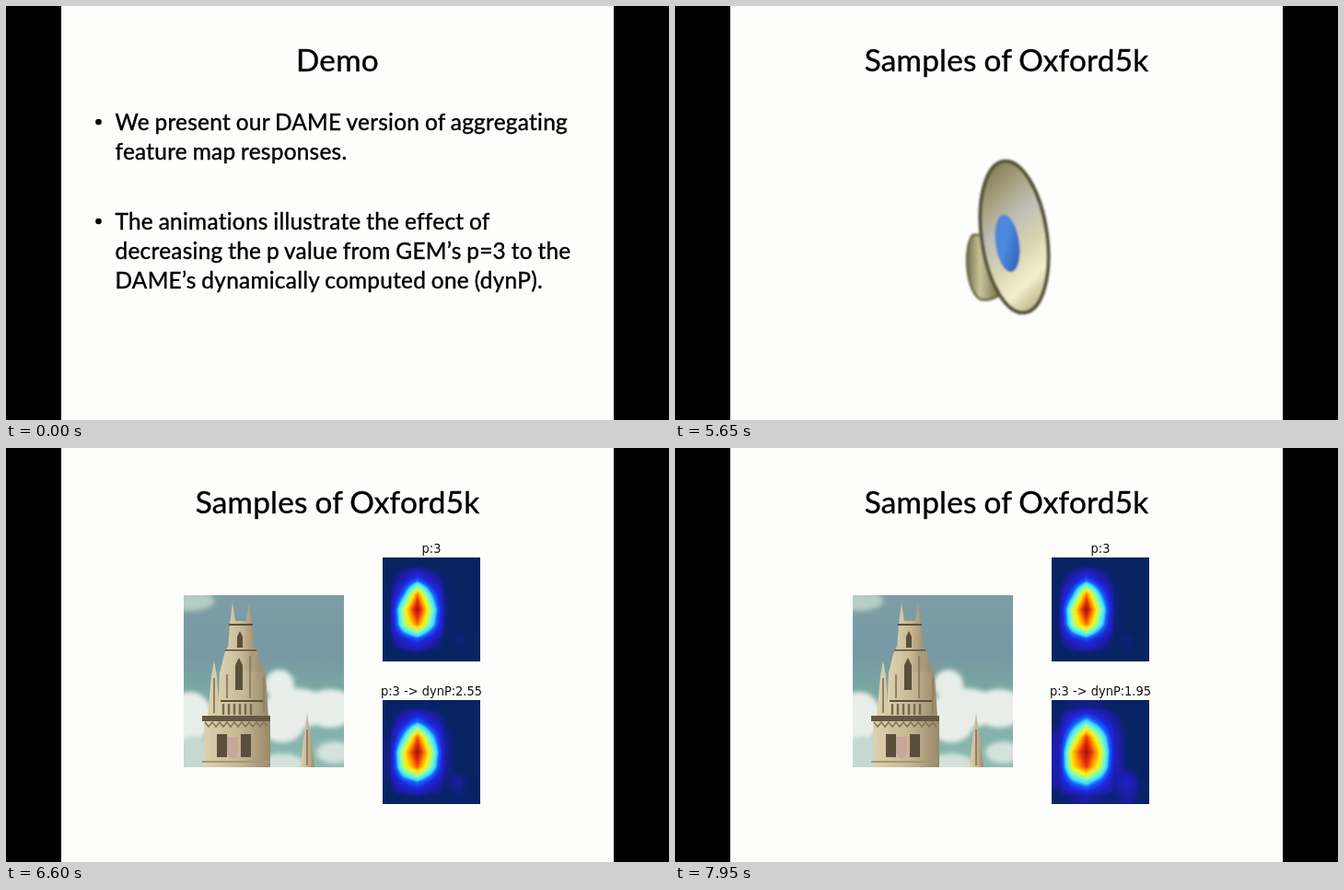
An HTML page with a canvas that plays this animation: 720x450 px, repeating every 8000 ms.

```html
<!DOCTYPE html>
<html lang="en">
<head>
<meta charset="utf-8">
<title>Demo slides</title>
<style>
html, body { margin: 0; width: 100%; height: 100%; overflow: hidden; background: #000; }
#stage { position: absolute; left: 0; top: 0; width: 720px; height: 450px; overflow: hidden; }
#stage > svg { position: absolute; left: 0; top: 0; }
canvas { position: absolute; left: 409px; width: 106px; height: 113px; }
#top { top: 119px; }
#low { top: 274px; }
.title, .body { stroke: #000; stroke-width: .4px; }
.title { font: 33.3px Lato, sans-serif; letter-spacing: .25px; word-spacing: -1px; text-anchor: middle; }
.body { font: 24.4px Lato, sans-serif; letter-spacing: .27px; word-spacing: -.8px; }
.label { font: 13px "DejaVu Sans", sans-serif; text-anchor: middle; }
</style>
</head>
<body>
<div id="stage">
<svg width="720" height="450" viewBox="0 0 720 450">
  <defs>
    <linearGradient id="sky" x1="0" y1="0" x2="0" y2="1">
      <stop offset="0" stop-color="#7d9ea6"/><stop offset=".35" stop-color="#7799a4"/>
      <stop offset=".55" stop-color="#78a8a2"/><stop offset="1" stop-color="#8db9b1"/>
    </linearGradient>
    <linearGradient id="stone">
      <stop offset="0" stop-color="#ddd2ae"/><stop offset=".55" stop-color="#c6b592"/>
      <stop offset="1" stop-color="#988969"/>
    </linearGradient>
    <linearGradient id="cone" x1=".3" y1="0" x2=".6" y2="1">
      <stop offset="0" stop-color="#807a50"/><stop offset=".22" stop-color="#a8a280"/>
      <stop offset=".42" stop-color="#c2bfb8"/><stop offset=".62" stop-color="#d8d3ae"/>
      <stop offset=".82" stop-color="#f3efcf"/><stop offset="1" stop-color="#bdb78a"/>
    </linearGradient>
    <linearGradient id="magnet">
      <stop offset="0" stop-color="#77714a"/><stop offset=".4" stop-color="#c9c49a"/>
      <stop offset="1" stop-color="#6e6945"/>
    </linearGradient>
    <linearGradient id="dome" x1="0" y1="0" x2="1" y2="1">
      <stop offset="0" stop-color="#4f86cf"/><stop offset=".45" stop-color="#4b8ade"/>
      <stop offset="1" stop-color="#2a57ac"/>
    </linearGradient>
    <filter id="soft"><feGaussianBlur stdDeviation="2.5"/></filter>
    <filter id="blur"><feGaussianBlur stdDeviation="1"/></filter>
  </defs>

  <rect x="60" width="600" height="450" fill="#fdfdfc"/>

  <g id="intro">
    <text class="title" x="360" y="71">Demo</text>
    <circle cx="100.5" cy="126" r="3.3"/>
    <circle cx="100.5" cy="234" r="3.3"/>
    <g class="body">
      <text x="118.5" y="134.5">We present our DAME version of aggregating</text>
      <text x="118.5" y="166.5">feature map responses.</text>
      <text x="118.5" y="243">The animations illustrate the effect of</text>
      <text x="118.5" y="275">decreasing the p value from GEM’s p=3 to the</text>
      <text x="118.5" y="307">DAME’s dynamically computed one (dynP).</text>
    </g>
  </g>

  <g id="samples">
    <text class="title" x="360" y="71">Samples of Oxford5k</text>

    <g id="speaker" filter="url(#blur)">
      <path d="M323 249Q334 246 345 262L353 314Q343 321 332 319C317 312 312 266 323 249Z"
        fill="url(#magnet)" stroke="#6b6744" stroke-width="2.5"/>
      <ellipse cx="368.5" cy="251" rx="35.5" ry="83" transform="rotate(-8 368.5 251)"
        fill="url(#cone)" stroke="#57523a" stroke-width="4"/>
      <ellipse cx="361" cy="258" rx="13" ry="31.5" transform="rotate(-8 361 258)" fill="url(#dome)"/>
    </g>

    <g id="results">
      <svg x="193" y="160" width="174" height="187" viewBox="193 160 174 187">
        <rect x="193" y="160" width="174" height="187" fill="url(#sky)"/>
        <g fill="#e9eeea" filter="url(#soft)">
          <ellipse cx="200" cy="166" rx="26" ry="11" fill="#b5cdc4"/>
          <ellipse cx="200" cy="292" rx="24" ry="27"/>
          <ellipse cx="297" cy="257" rx="16" ry="16"/>
          <ellipse cx="315" cy="283" rx="36" ry="22"/>
          <ellipse cx="352" cy="283" rx="28" ry="21"/>
          <ellipse cx="300" cy="300" rx="24" ry="20"/>
          <ellipse cx="204" cy="335" rx="22" ry="22" fill="#c4d9d2"/>
          <ellipse cx="357" cy="331" rx="20" ry="12" fill="#d3e2dc"/>
          <ellipse cx="300" cy="344" rx="24" ry="12" fill="#d3e2dc"/>
        </g>
        <g fill="url(#stone)">
          <path d="M243 191L246 168L249 188H261L264 168L267 191L270 220L273 246H237L241 220Z"/>
          <path d="M237 224L241 215L244 245H232ZM268 245L269 215L274 224L279 245Z"/>
          <path d="M232 243H279L284 292H230Z"/>
          <path d="M219 292L223 248L226 231L229 248L232 292ZM275 292L278 248L280 231L282 248L285 292Z"/>
          <path d="M215 296H287V347H215Z"/>
          <path d="M320 347L323 316L327 288L331 316L335 347Z"/>
        </g>
        <path d="M213 291H287V297H213Z" fill="#645842"/>
        <path d="M216 298l4 5 4-5 4 5 4-5 4 5 4-5 4 5 4-5 4 5 4-5 4 5 4-5 4 5 4-5 4 5 4-5 4 5"
          fill="none" stroke="#83745a" stroke-width="1.5"/>
        <g fill="#594f3c">
          <path d="M251 217V205L254 199L257 205V217ZM249 263V236L253 228L257 236V263Z"/>
          <path d="M229 311H240V336H229ZM255 311H266V336H255Z"/>
          <path d="M242 191H268V193H242ZM238 219H272V220.5H238ZM233 274H280V276H233Z"/>
        </g>
        <path d="M236 278V290M242 278V290M248 278V290M254 278V290M260 278V290M266 278V290"
          stroke="#766950" stroke-width="2.5"/>
        <path d="M240 246V272M265 226V272M226 250V288M280 250V288M327 306V345"
          stroke="#927f67" stroke-width="2"/>
        <path d="M240 314H252V328Q252 335 246 338Q240 335 240 328Z" fill="#c6a79b"/>
        <path d="M213 341H286" stroke="#a59678" stroke-width="2"/>
      </svg>
      <g class="label" fill="#111">
        <text transform="translate(462 113.5) scale(1 1.07)">p:3</text>
        <text id="count" transform="translate(462 269) scale(1 1.07)"></text>
      </g>
    </g>
  </g>
</svg>
<canvas id="top" width="106" height="113"></canvas>
<canvas id="low" width="106" height="113"></canvas>
</div>

<script>
const $ = id => document.getElementById(id);
const SLIDE = 5650, VIDEO = 5700, LOOP = 8000, FIRST = 5570, STEP = 1000 / 3;

// Pooled responses at p = 3 on a 7 x 7 grid, in percent of the peak
const N = 7;
const grid = [
  [.2, .8, 1.2, .8, .2, .1, .1],
  [.5, 11,  27, 11,  2, .1, .1],
  [2,  31,  80, 35,  4, .1, .1],
  [3,  58, 100, 52,  5, .1, .1],
  [3,  52,  80, 43,  4, .3, .1],
  [2,  17,  27, 13,  2,  5, .3],
  [.3,  1,   2,  1, .8,  2, .3]
];

const palette = (() => {
  const ctx = Object.assign(document.createElement("canvas"), { width: 256, height: 1 }).getContext("2d");
  const ramp = ctx.createLinearGradient(0, 0, 256, 0);
  const stops = {
    0: "#08245f", .03: "#082368", .08: "#1c1ca5", .2: "#1e28df", .3: "#1464ff", .38: "#3cdcfa",
    .48: "#78fac8", .58: "#c8fa5a", .66: "#ffeb0a", .76: "#ff9600", .87: "#eb320a", 1: "#96140f"
  };
  for (const at in stops) ramp.addColorStop(+at, stops[at]);
  ctx.fillStyle = ramp;
  ctx.fillRect(0, 0, 256, 1);
  return ctx.getImageData(0, 0, 256, 1).data;
})();

// Cell centres around a pixel, for bilinear interpolation
function locate(i, size) {
  const g = Math.min(N - 1, Math.max(0, (i + .5) / size * N - .5));
  const a = Math.min(N - 2, Math.floor(g));
  return [a, g - a];
}

const mix = (a, b, f) => a + (b - a) * f;

function drawMap(canvas, p) {
  const { width: w, height: h } = canvas, ctx = canvas.getContext("2d");
  const image = ctx.createImageData(w, h);
  const v = grid.map(row => row.map(x => (x / 100) ** (p / 3)));
  for (let y = 0; y < h; y++) {
    const [r, fy] = locate(y, h);
    for (let x = 0; x < w; x++) {
      const [c, fx] = locate(x, w);
      const heat = mix(mix(v[r][c], v[r][c + 1], fx), mix(v[r + 1][c], v[r + 1][c + 1], fx), fy);
      const k = Math.round(heat * 255) * 4;
      image.data.set(palette.subarray(k, k + 4), (y * w + x) * 4);
    }
  }
  ctx.putImageData(image, 0, 0);
}

const show = (id, on) => $(id).style.display = on ? "" : "none";
let shown;

function frame() {
  const t = performance.now() % LOOP, video = t >= VIDEO;
  show("intro", t < SLIDE);
  show("samples", t >= SLIDE);
  show("speaker", !video);
  for (const id of ["results", "top", "low"]) show(id, video);
  const p = 3 - .15 * Math.max(0, Math.floor((t - FIRST) / STEP));
  if (p !== shown) {
    drawMap($("low"), p);
    $("count").textContent = "p:3 -> dynP:" + p.toFixed(2);
    shown = p;
  }
  requestAnimationFrame(frame);
}

drawMap($("top"), 3);
frame();
</script>
</body>
</html>
```
